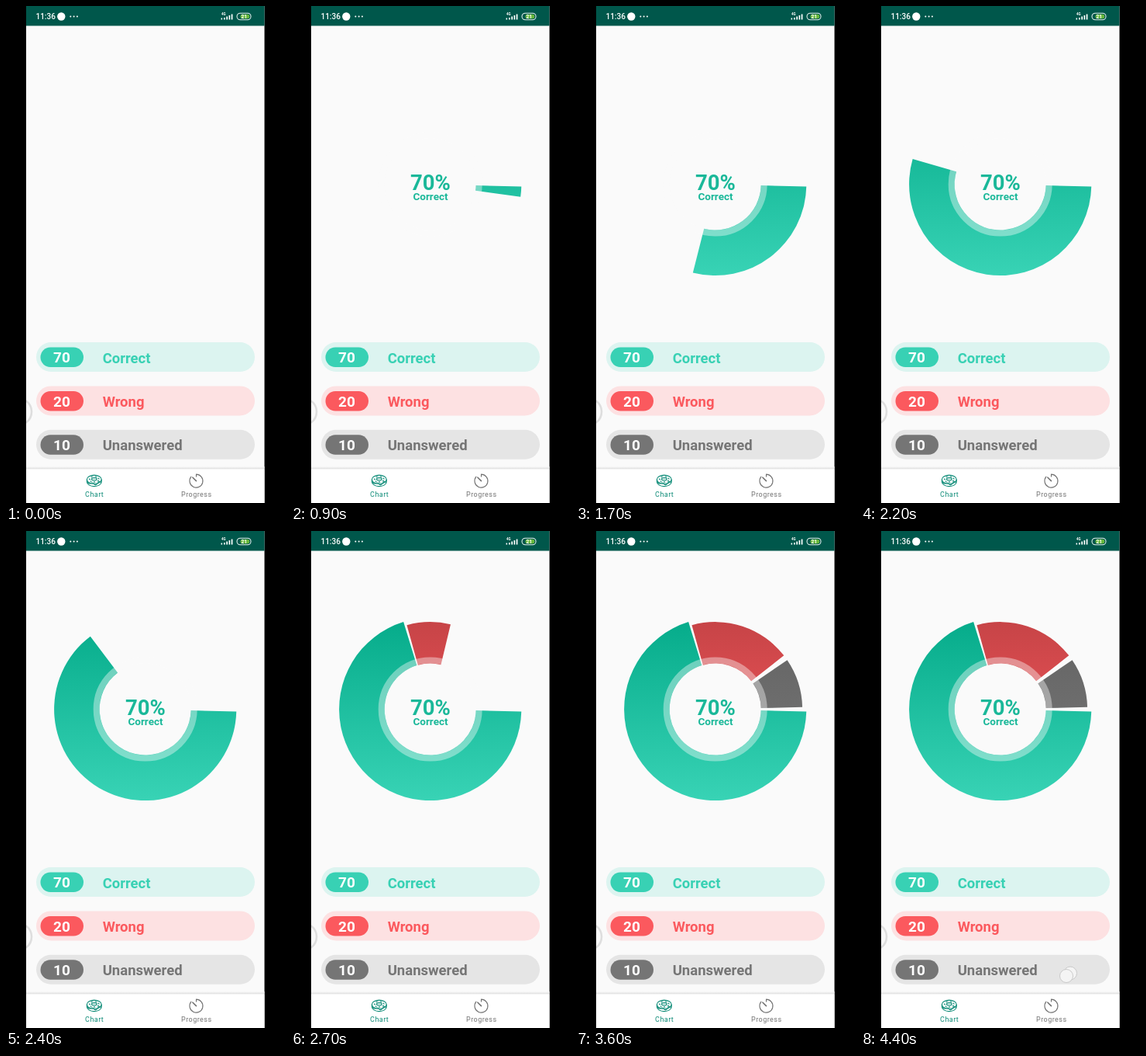
Animation, 360 px wide and 640 px high, one loop 4500 ms. Source, as an HTML page:

```html
<!DOCTYPE html>
<html lang="en">
<head>
<meta charset="utf-8">
<title>Quiz result chart</title>
<style>
  html, body { margin: 0; width: 100%; height: 100%; overflow: hidden; background: #000; }
  svg { display: block; width: 100%; height: 100%; font-family: Roboto, "Noto Sans", sans-serif; }
  .bold { font-weight: 700; }
  .mid { text-anchor: middle; }
  .nav { font-size: 9px; letter-spacing: .45px; text-anchor: middle; }
  .line { fill: none; stroke-linecap: round; }
</style>
</head>
<body>
<svg viewBox="0 0 360 640">
  <defs>
    <linearGradient id="green" gradientUnits="userSpaceOnUse" x1="0" y1="113" x2="0" y2="347">
      <stop offset="0" stop-color="#05ab8a"/><stop offset="1" stop-color="#38d3b5"/>
    </linearGradient>
    <linearGradient id="red" gradientUnits="userSpaceOnUse" x1="0" y1="117" x2="0" y2="347">
      <stop offset="0" stop-color="#c74447"/><stop offset="1" stop-color="#fb5a5e"/>
    </linearGradient>
    <linearGradient id="gray" gradientUnits="userSpaceOnUse" x1="0" y1="117" x2="0" y2="347">
      <stop offset="0" stop-color="#636363"/><stop offset="1" stop-color="#787878"/>
    </linearGradient>
    <linearGradient id="shade" x1="0" y1="0" x2="0" y2="1">
      <stop offset="0" stop-color="#fafafa"/><stop offset="1" stop-color="#dcdcdc"/>
    </linearGradient>
    <clipPath id="screen"><rect x="26" width="307.5" height="640"/></clipPath>
  </defs>

  <rect width="360" height="640" fill="#000"/>
  <g clip-path="url(#screen)">
    <rect x="26" width="308" height="640" fill="#fafafa"/>

    <!-- status bar -->
    <rect x="26" width="308" height="25.5" fill="#00574b"/>
    <g fill="#fff">
      <text x="38.5" y="17" font-size="10" font-weight="500">11:36</text>
      <circle cx="71.3" cy="13.5" r="5.2"/>
      <circle cx="83.3" cy="13.5" r="1"/><circle cx="87.6" cy="13.5" r="1"/><circle cx="91.9" cy="13.5" r="1"/>
      <text x="278" y="12" font-size="4.5" class="bold">4G</text>
      <path d="M277.5 15.5h1.6v2h-1.6zM281 15h1.7v2.500h-1.700zM284.300 13.500h1.700v4h-1.700zM287.500 12h1.700v5.500h-1.700zM290.700 10.500h1.700v7h-1.700z"/>
    </g>
    <rect x="298" y="9.200" width="18" height="8.600" rx="4.300" fill="#00574b" stroke="#e4f0ec" stroke-width="1.100"/>
    <rect x="302.500" y="10.700" width="11.700" height="5.600" rx="2.400" fill="#67b83c"/>
    <text x="307.200" y="16" font-size="6.500" fill="#fff" class="bold mid">21</text>

    <!-- chart -->
    <g id="chart">
      <g id="slices"></g>
      <circle cx="179.700" cy="229.500" r="63" fill="none" stroke="#fafafa" stroke-opacity=".4" stroke-width="8"/>
      <g fill="#1ab899" class="bold mid">
        <text x="180" y="236.500" font-size="27.500">70%</text>
        <text x="180" y="249.800" font-size="13.500">Correct</text>
      </g>
    </g>

    <g id="legend"></g>

    <!-- edge handle -->
    <path class="line" d="M26.500 509Q33 514 33 522.500T26.500 536" stroke="#dedede" stroke-width="2.600"/>

    <!-- bottom navigation -->
    <rect x="26" y="593" width="308" height="3.500" fill="url(#shade)"/>
    <rect x="26" y="596.500" width="308" height="44" fill="#fff"/>
    <g class="line" stroke="#0b8a76" stroke-width="1.100">
      <ellipse cx="113.800" cy="609.700" rx="9.400" ry="5.600"/>
      <ellipse cx="113.800" cy="609.200" rx="3.400" ry="1.600"/>
      <path d="M104.400 610v2.600c0 3.400 4.200 6 9.400 6s9.400-2.600 9.400-6V610"/>
      <path d="M105 613.300q2.200 2.500 4.400 1.200t4.400 1.200 4.400-1.200 4.400-1.200"/>
      <path d="M107.300 609l1.200.7M110 606.400l1.300-.5M115.500 605.900l1.300.5M119 608l1 .8M118.300 611.700l1.200-.6M113.300 612.900h1.400M109 612l1 .5"/>
    </g>
    <g class="line" stroke="#6f6f6f" stroke-width="1.100">
      <path d="M245.500 606v-2.900a8.500 8.500 0 1 1-6.600 3.100"/>
      <path d="M240.800 607l4.700 4.600" stroke-width="1.500"/>
    </g>
    <text class="nav" x="114.200" y="632" fill="#0b8a76">Chart</text>
    <text class="nav" x="245.800" y="632" fill="#757575">Progress</text>

    <g fill="#f4f4f4" stroke="#c6c6c6" stroke-width=".9">
      <circle id="trail" cx="270" cy="569.500" r="8.500"/>
      <circle id="touch" cx="265" cy="573" r="8.500"/>
    </g>
  </g>
</svg>

<script>
const LOOP = 4500, STEP = 100;
const SHOW = 700, SWEEP_START = 615, SWEEP_TIME = 3000;
const CX = 179.7, CY = 229.5, HOLE = 59;

const $ = id => document.getElementById(id);

function add(parent, tag, attrs, text = '') {
  const el = document.createElementNS('http://www.w3.org/2000/svg', tag);
  for (const key in attrs) el.setAttribute(key, attrs[key]);
  el.textContent = text;
  return parent.appendChild(el);
}

const rows = [
  { count: 70, label: 'Correct', main: '#38d1b4', pale: '#dcf4f0' },
  { count: 20, label: 'Wrong', main: '#fb595e', pale: '#fde1e2' },
  { count: 10, label: 'Unanswered', main: '#757575', pale: '#e5e5e5' }
];
rows.forEach(({ count, label, main, pale }, i) => {
  const g = add($('legend'), 'g', { transform: `translate(0 ${433 + i * 56.4})`, class: 'bold' });
  add(g, 'rect', { x: 39, width: 282, height: 38, rx: 19, fill: pale });
  add(g, 'rect', { x: 44.5, y: 6.5, width: 55.5, height: 25.5, rx: 12.75, fill: main });
  add(g, 'text', { x: 72, y: 26.2, 'font-size': 19, fill: '#fff', class: 'mid' }, count);
  add(g, 'text', { x: 124.7, y: 26.7, 'font-size': 18.5, fill: main }, label);
});

// Angles run clockwise in degrees from the right-hand side.
const slices = [
  { from: 1.5, to: 252.9, radius: 117.6, fill: 'url(#green)' },
  { from: 254.4, to: 322, radius: 112.4, fill: 'url(#red)' },
  { from: 325.7, to: 358.6, radius: 112.4, fill: 'url(#gray)' }
];
for (const s of slices) s.el = add($('slices'), 'path', { fill: s.fill });

function point(radius, deg) {
  const a = deg * Math.PI / 180;
  return `${(CX + radius * Math.cos(a)).toFixed(2)} ${(CY + radius * Math.sin(a)).toFixed(2)}`;
}

function wedge(from, to, radius) {
  if (to <= from) return '';
  const large = to - from > 180 ? 1 : 0;
  return `M${point(HOLE, from)}L${point(radius, from)}` +
    `A${radius} ${radius} 0 ${large} 1 ${point(radius, to)}` +
    `L${point(HOLE, to)}A${HOLE} ${HOLE} 0 ${large} 0 ${point(HOLE, from)}Z`;
}

const show = (id, on) => $(id).setAttribute('visibility', on ? 'visible' : 'hidden');

function draw(now) {
  const t = Math.floor(now % LOOP / STEP) * STEP;
  const x = Math.min(1, Math.max(0, (t - SWEEP_START) / SWEEP_TIME));
  const edge = 180 * (1 - Math.cos(Math.PI * x));
  for (const s of slices) s.el.setAttribute('d', wedge(s.from, Math.min(s.to, edge), s.radius));
  show('chart', t >= SHOW);
  show('trail', t >= 4300);
  show('touch', t >= 4400);
}

function tick() {
  draw(performance.now());
  requestAnimationFrame(tick);
}
tick();
</script>
</body>
</html>
```
